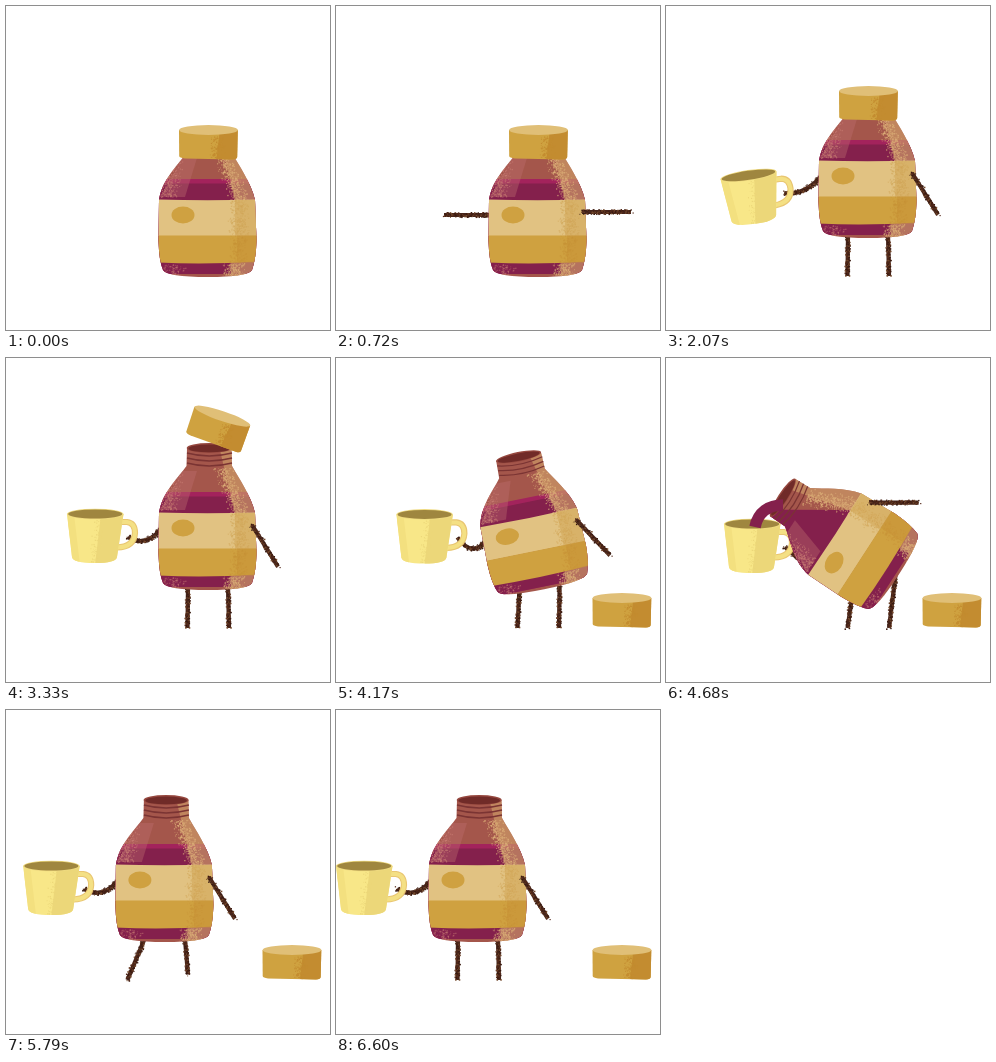
Write an HTML page with a canvas that moves like this. It is 324 px wide and 324 px high and loops after 6630 ms.

```html
<!DOCTYPE html>
<html lang="en">
<head>
<meta charset="utf-8">
<title>Bottle and mug</title>
<style>
  html, body { margin: 0; width: 100%; height: 100%; overflow: hidden; background: #fff; }
  canvas { display: block; width: 324px; height: 324px; }
</style>
</head>
<body>
<canvas id="stage"></canvas>
<script>
const LOOP = 6630, STEP = 30, SIZE = 324;
const POP = 3270, LAND = 3768;
const canvas = document.getElementById('stage');
const ctx = canvas.getContext('2d');
const dpr = window.devicePixelRatio || 1;
canvas.width = canvas.height = SIZE * dpr;

const rad = deg => deg * Math.PI / 180;
const mix = (a, b, u) => a + (b - a) * u;
const part = (t, a, b) => Math.min(1, Math.max(0, (t - a) / (b - a)));
const arc = (t, a, b) => Math.sin(Math.PI * part(t, a, b));
function ease(t, a, b) {
  const u = part(t, a, b);
  return u * u * (3 - 2 * u);
}
// Eases out past the goal and settles back.
function spring(t, a, b, over = 1.7) {
  const u = part(t, a, b) - 1;
  return 1 + (over + 1) * u ** 3 + over * u * u;
}

function poseAt(t) {
  const rise = spring(t, 840, 1260);
  const squat = ease(t, 2700, 3200) - ease(t, 3200, 3300);
  const pour = ease(t, 4020, 4540) - ease(t, 5370, 5680);
  const walk = ease(t, 5400, 6000);
  const settle = ease(t, 2010, 2190);

  const p = {
    pour,
    x: 202 + 30 * pour - 60 * walk,
    y: 270 - 39 * rise + 10 * squat - 15 * pour * pour,
    tilt: -57 * pour + 2.5 * arc(t, 3750, 4020),
    stretch: 1 - .06 * squat - .02 * pour + .04 * arc(t, 3750, 3990) - .045 * arc(t, 4000, 4340),
    arms: spring(t, 150, 510),
    swing: 58 * spring(t, 900, 1230) * (1 - pour) - 10 * squat,
    mugTilt: -11 * (1 - settle),
    leftStep: 60 * ease(t, 5430, 5700),
    rightStep: 60 * ease(t, 5640, 5880)
  };
  p.body = new DOMMatrix().translate(p.x, p.y).rotate(p.tilt)
    .scale(1.5 - p.stretch / 2, p.stretch).translate(-202, -231);
  p.at = (x, y) => p.body.transformPoint(new DOMPoint(x, y));

  // The left hand hangs, slips behind the body, then comes out with the mug.
  const shoulder = p.at(156, 170), length = 46 * p.arms;
  const hide = ease(t, 1530, 1800), show = spring(t, 1800, 2190, 1);
  const hold = {
    x: 124 - 3 * pour - 6 * squat - 61 * walk,
    y: mix(190, 179, settle) + 6 * squat + 10 * pour * pour
  };
  p.leftShoulder = shoulder;
  p.hand = t < 1800 ? {
    x: mix(shoulder.x - length * Math.cos(rad(p.swing)), 230, hide),
    y: mix(shoulder.y + length * Math.sin(rad(p.swing)), 190, hide)
  } : { x: mix(230, hold.x, show), y: hold.y };
  return p;
}

function random(seed) {
  return () => {
    seed = seed + 0x6D2B79F5 | 0;
    let r = Math.imul(seed ^ seed >>> 15, 1 | seed);
    r = r + Math.imul(r ^ r >>> 7, 61 | r) ^ r;
    return ((r ^ r >>> 14) >>> 0) / 4294967296;
  };
}

function fill(shape, color) {
  ctx.fillStyle = color;
  ctx.fill(typeof shape === 'string' ? new Path2D(shape) : shape);
}
function stroke(shape, color, width) {
  ctx.strokeStyle = color;
  ctx.lineWidth = width;
  ctx.stroke(new Path2D(shape));
}
function ellipse(x, y, rx, ry, color) {
  const p = new Path2D();
  p.ellipse(x, y, rx, ry, 0, 0, 7);
  fill(p, color);
}
function rect(x, y, w, h, color) {
  ctx.fillStyle = color;
  ctx.fillRect(x, y, w, h);
}
function scoped(draw) {
  ctx.save();
  draw();
  ctx.restore();
}

// Brush grain in a slanted strip: denser toward its middle.
function grain(count, x, y, w, h, lean, color) {
  const r = random(count);
  for (let i = 0; i < count; i++) {
    const v = r(), s = .6 + r() * .8;
    rect(x + (r() + r()) / 2 * w + lean * v, y + v * h, s, s, color);
  }
}

function limb(from, to, slack = 0) {
  const cx = (from.x + to.x) / 2, cy = (from.y + to.y) / 2 + slack;
  const length = Math.hypot(to.x - from.x, to.y - from.y) + slack;
  if (length < 2) return;
  stroke(`M${from.x} ${from.y}Q${cx} ${cy} ${to.x} ${to.y}`, '#45241a', 4.2);
  const r = random(7), tones = ['#38190f', '#54291a', '#74492c'];
  const n = Math.round(length * 2.4);
  for (let i = 0; i <= n; i++) {
    const u = i / n, w = 1 - u, s = .9 + r() * .7;
    const x = w * w * from.x + 2 * u * w * cx + u * u * to.x;
    const y = w * w * from.y + 2 * u * w * cy + u * u * to.y;
    rect(x + (r() - .5) * 4.8 - s / 2, y + (r() - .5) * 4.8 - s / 2, s, s, tones[i % 3]);
  }
}

const GLASS = new Path2D('M181 90L180.5 108C173 119 156 134 153 155L152.5 195Q153 216 157 225Q161 232 202 232Q242 232 246 225Q250 214 250.5 195L249 155C245 137 233 121 226 108L225.5 90Z');

function bottle(tilt) {
  fill(GLASS, '#a4564b');
  scoped(() => {
    ctx.clip(GLASS);
    // The surface turns level once the bottle tips far enough.
    const level = part(-tilt, 14, 50);
    const edge = (x, dy) => `${x} ${134 - 23 * level + 1.6 * level * (x - 202) + dy}`;
    const liquid = dy => `M${edge(140, dy)}L${edge(260, dy)}L260 229L140 229Z`;
    fill(liquid(0), '#a3235c');
    fill(liquid(4.5 * (1 - level)), '#84204c');

    fill('M176 113L191 113L179 152L154 152Z', 'rgba(190,112,110,.38)');
    grain(380, 155, 116, 24, 36, -6, 'rgba(200,125,115,.6)');
    grain(90, 154, 219, 26, 12, 0, 'rgba(190,112,110,.6)');
    fill('M213 88L230 88L254 150L254 235L224 235L229 156Z', 'rgba(207,158,105,.66)');
    grain(420, 205, 110, 22, 46, 18, 'rgba(219,174,119,.75)');
    grain(180, 214, 218, 26, 14, 0, 'rgba(219,174,119,.7)');

    fill('M150 154.5Q202 156 252 154.5V191H150Z', '#e1c282');
    fill('M150 190.5H252V216.5Q202 220 150 217.5Z', '#cfa140');
    rect(229, 155, 24, 36, 'rgba(207,163,83,.5)');
    grain(260, 221, 155, 22, 36, 0, 'rgba(208,166,88,.6)');
    rect(231, 190.5, 22, 27, 'rgba(200,146,55,.5)');
    grain(150, 222, 191, 20, 26, 0, 'rgba(200,146,55,.5)');
    ellipse(177, 170, 11.5, 8.5, '#cfa141');
  });
  for (let y = 95; y <= 105; y += 5) stroke(`M181 ${y}Q203 ${y + 6} 226 ${y}`, '#7b3433', 1.3);
  ellipse(203.2, 90, 22.5, 5, '#96483f');
  ellipse(203.2, 90.4, 20.8, 3.9, '#702b28');
}

// Drawn around its own centre.
function cap() {
  fill('M-29.5 -12L-29.3 14Q-29 16 -24 16.4L24 17.4Q28.5 17.4 28.7 15L29.3 -12Z', '#cfa240');
  fill('M11 -9L29.3 -12L28.7 15Q28.5 17.4 24 17.4L8 17Z', '#c38c30');
  grain(120, 0, -6, 18, 22, -2, '#c38c30');
  ellipse(0, -12, 29.4, 5, '#e0bf77');
}

// Drawn around the hand holding its handle.
function mug() {
  ctx.translate(-124, -179);
  const handle = 'M113 164H121Q129 165 129 175Q128 189 111 189.5';
  stroke(handle, '#e9c672', 6.2);
  stroke(handle, '#f4e084', 4);
  const side = new Path2D('M61 156L66 199Q67 205 89 205Q110 205 111 199L117.5 156Z');
  fill(side, '#f8e788');
  scoped(() => {
    ctx.clip(side);
    fill('M95 156H119L114 207H89Z', '#ecd779');
    fill('M61 156H68L74 207H64Z', '#f3e07f');
    grain(70, 86, 161, 12, 43, -4, '#ecd779');
  });
  ellipse(89.2, 156, 28.3, 5.3, '#efda80');
  ellipse(89.2, 156, 27, 4.5, '#9f863f');
}

function stream(t) {
  const length = 42, head = part(t, 4560, 4680), tail = part(t, 5340, 5430);
  if (head === 0 || tail === 1) return;
  ctx.setLineDash([(head - tail) * length, 200]);
  ctx.lineDashOffset = -tail * length;
  stroke('M117 147C103 147 92 154 89 169', '#84204c', 11.5);
  ctx.setLineDash([]);
}

function flyingCap(t) {
  const run = part(t, POP, LAND), fall = (t - 3430) / 1000;
  const y = t < LAND ? 52 + 1750 * fall * fall : 252 - 8 * arc(t, LAND, LAND + 210);
  ctx.translate(mix(202.5, 286, run), y);
  ctx.rotate(rad(21 * Math.sin(Math.PI * Math.sqrt(run))));
  cap();
}

function frame(t) {
  const p = poseAt(t), { hand, leftShoulder } = p;
  ctx.setTransform(dpr, 0, 0, dpr, 0, 0);
  rect(0, 0, SIZE, SIZE, '#fff');

  if (p.y < 268) {
    const hip = side => ({ x: p.x + 20 * side - 22 * p.pour, y: p.y - 3 });
    limb(hip(-1), { x: 181.5 - p.leftStep, y: 270 - 6 * arc(t, 5430, 5700) });
    limb(hip(1), { x: 223 - p.rightStep, y: 270 - 6 * arc(t, 5640, 5880) });
  }

  if (p.arms > 0) {
    const reach = Math.hypot(hand.x - leftShoulder.x, hand.y - leftShoulder.y);
    const full = 46 * p.arms;
    limb(leftShoulder, { x: hand.x - 2, y: hand.y }, .5 * Math.sqrt(Math.max(0, full * full - reach * reach)));
  }
  if (t >= 1800) scoped(() => {
    ctx.translate(hand.x, hand.y);
    ctx.rotate(rad(p.mugTilt));
    mug();
  });

  scoped(() => {
    const m = p.body;
    ctx.transform(m.a, m.b, m.c, m.d, m.e, m.f);
    bottle(p.tilt);
    if (t < POP) {
      ctx.translate(202.5, 97);
      cap();
    }
  });
  stream(t);

  if (p.arms > 0) {
    const s = p.at(246, 167), a = rad(p.swing), length = 49 * p.arms;
    limb(s, { x: s.x + length * Math.cos(a), y: s.y + length * Math.sin(a) });
  }
  if (t >= POP) scoped(() => flyingCap(t));
}

const start = performance.now();
function tick() {
  const t = (performance.now() - start) % LOOP;
  frame(Math.floor(t / STEP) * STEP);
  requestAnimationFrame(tick);
}
tick();
</script>
</body>
</html>
```
